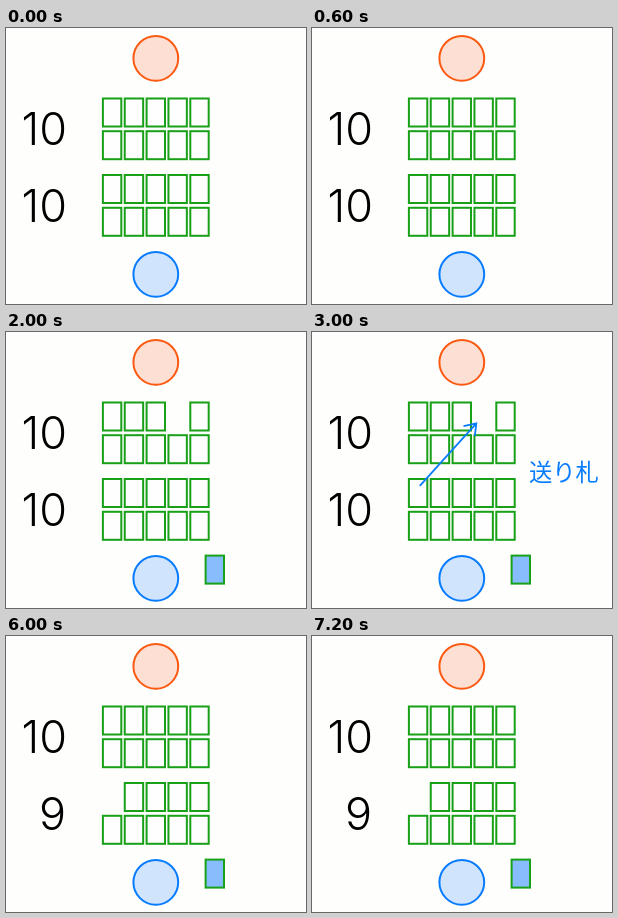
An HTML page for the animation above (8 s loop, 300 by 276 pixels).

```html
<!DOCTYPE html>
<html lang="ja">
<head>
<meta charset="utf-8">
<title>送り札</title>
<style>
  html, body { margin: 0; width: 100%; height: 100%; overflow: hidden; background: #fefefc; }
  svg { display: block; width: 300px; height: 276px; }
  .card { fill: #fefefe; stroke: #18a018; stroke-width: 2; }
  .count { font: 300 45px Inter, sans-serif; text-anchor: end; fill: #000; }
  .label { font: 350 23.3px "Noto Sans CJK JP", "Noto Sans CJK", sans-serif; fill: #087cff; }
  .arrow { fill: none; stroke: #087cff; stroke-width: 1.8; }
  .taken, .won, .passing, .before, .after, .sent { animation: 8s step-end infinite; }
  .taken { animation-name: taken; }
  .won { animation-name: won; }
  .passing { animation-name: passing; }
  .before, .sent { animation-name: before; }
  .after { animation-name: after; }
  @keyframes taken {
    0% { fill: #fefefe; visibility: visible; }
    12.5% { fill: #88bdfd; visibility: visible; }
    25% { fill: #fefefe; visibility: hidden; }
    75%, 100% { fill: #fefefe; visibility: visible; }
  }
  @keyframes won { 0% { visibility: hidden; } 25%, 100% { visibility: visible; } }
  @keyframes passing {
    0% { visibility: hidden; }
    37.5% { visibility: visible; }
    75%, 100% { visibility: hidden; }
  }
  @keyframes before { 0% { visibility: visible; } 75%, 100% { visibility: hidden; } }
  @keyframes after { 0% { visibility: hidden; } 75%, 100% { visibility: visible; } }
</style>
</head>
<body>
<svg viewBox="0 0 300 276">
  <g stroke-width="2">
    <circle cx="149.8" cy="30.3" r="22.4" fill="#fde0d3" stroke="#fc5a12"/>
    <circle cx="149.8" cy="246.3" r="22.4" fill="#d0e4fe" stroke="#087cff"/>
  </g>
  <g id="cards"></g>
  <text class="count" x="61" y="117">10</text>
  <text class="count before" x="61" y="193.5">10</text>
  <text class="count after" x="60" y="193.5">9</text>
  <g class="passing">
    <path class="arrow" d="M107.8 153.8L164.3 91.3M151.5 94.2L164.3 91.3L162.8 104.2"/>
    <text class="label" x="217" y="148.5">送り札</text>
  </g>
</svg>
<script>
  const cards = document.getElementById('cards');

  function addCard(x, y, role = '') {
    const card = document.createElementNS('http://www.w3.org/2000/svg', 'rect');
    const attributes = { x, y, width: 18.4, height: 28, class: `card ${role}` };
    for (const [name, value] of Object.entries(attributes)) card.setAttribute(name, value);
    cards.append(card);
    return card;
  }

  const roles = { '0,3': 'taken', '2,0': 'sent' };
  [70.5, 103.2, 147, 179.8].forEach((y, row) => {
    for (let col = 0; col < 5; col++) addCard(96.9 + 21.85 * col, y, roles[`${row},${col}`]);
  });
  addCard(199.6, 223.6, 'won').style.fill = '#88bdfd';
</script>
</body>
</html>
```
